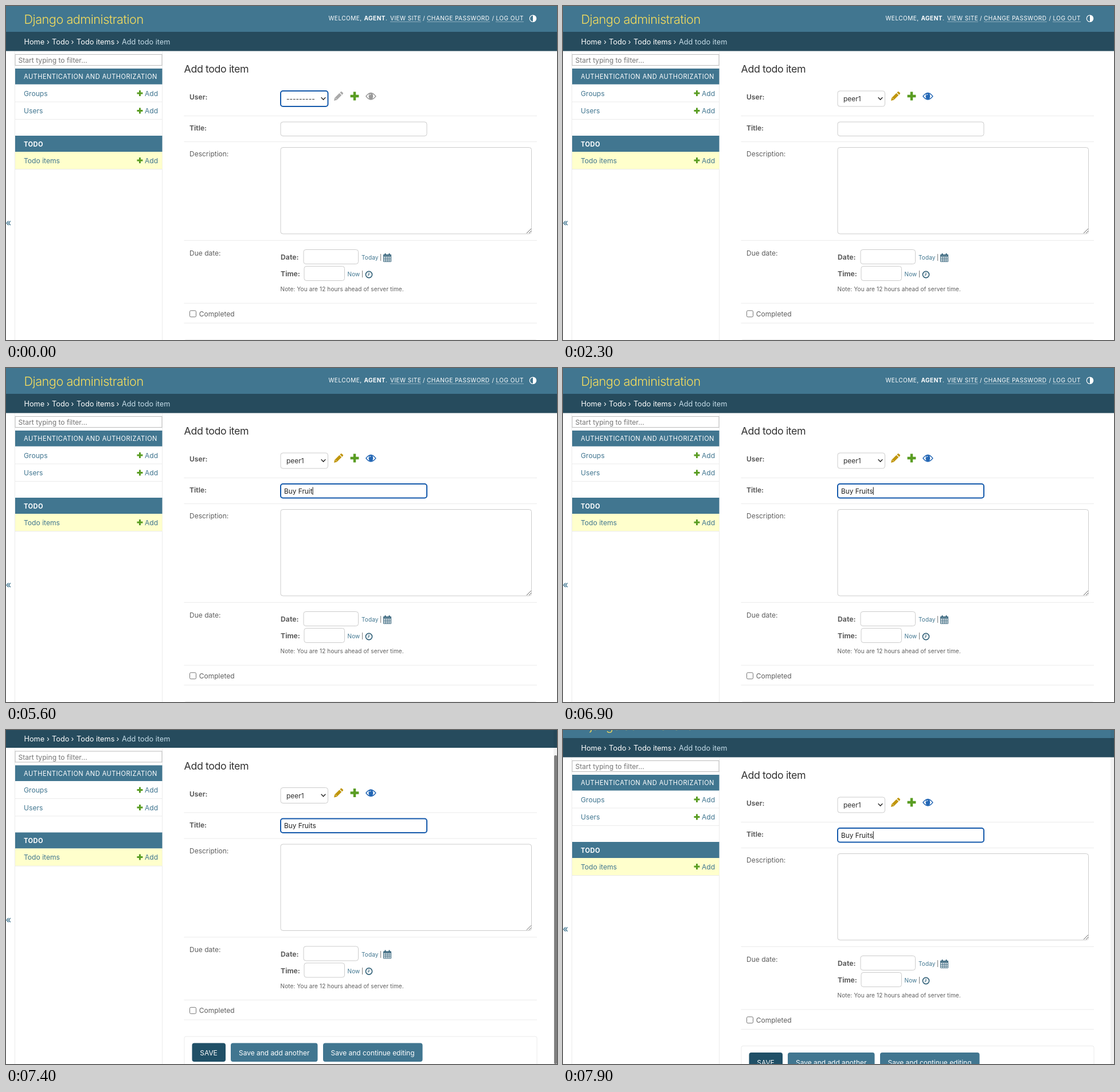
An HTML page for the animation above (8 s loop, 961 by 582 pixels).

```html
<!DOCTYPE html>
<html lang="en">
<head>
<meta charset="utf-8">
<title>Add todo item</title>
<style>
  html, body { margin: 0; width: 100%; height: 100%; overflow: hidden; background: #fff; }
  svg { display: block; font: 12px Inter, "Open Sans", sans-serif; font-optical-sizing: none; }
  text { white-space: pre; }
  .bold { font-weight: 700; }
  .line { stroke: #ebebeb; fill: none; }
  .box { fill: #fff; stroke: #ccc; }
  .focus { stroke: #1459ab; stroke-width: 2; }
  .tools { font-size: 10.05px; letter-spacing: .47px; fill: #fff; }
  .crumbs { font-size: 12.75px; fill: #fff; }
  .caption { font-size: 11.1px; letter-spacing: .45px; fill: #fff; }
  .link { fill: #417690; font-size: 12.1px; }
  .label { fill: #5f5f5f; }
  .small { font-size: 10px; letter-spacing: .12px; }
  .button { font-size: 11.95px; fill: #fff; }
</style>
</head>
<body>
<svg width="961" height="582" viewBox="0 0 961 582">
  <defs>
    <path id="plus" d="M-5 0H5M0-5V5" stroke="#5a9d23" stroke-width="3"/>
    <filter id="shadow" x="-30%" y="-30%" width="160%" height="160%">
      <feDropShadow dx="0" dy="2" stdDeviation="3.5" flood-opacity=".32"/>
    </filter>
  </defs>

  <g id="page">
    <rect width="961" height="45" fill="#417690"/>
    <rect y="45" width="961" height="33.5" fill="#264b5d"/>
    <text x="31.5" y="31" font-size="21.7" font-weight="300" letter-spacing="-.5" fill="#f5dd5d">Django administration</text>
    <g class="tools">
      <text x="562.5" y="25">WELCOME,</text>
      <text x="624.5" y="25"><tspan class="bold">AGENT</tspan>.</text>
      <text x="670" y="25">VIEW SITE</text>
      <text x="727" y="25">/</text>
      <text x="734" y="25">CHANGE PASSWORD</text>
      <text x="847.5" y="25">/</text>
      <text x="854.5" y="25">LOG OUT</text>
      <path d="M670 27.5H724M734 27.5H844M854 27.5H903" stroke="#fff" stroke-opacity=".4"/>
      <circle cx="919" cy="21.8" r="5.7" fill="none" stroke="#fff" stroke-width="1.2"/>
      <path d="M919 16a5.8 5.8 0 0 1 0 11.6z"/>
    </g>
    <g class="crumbs">
      <text x="31.5" y="67">Home</text><text x="71" y="67">›</text>
      <text x="80" y="67">Todo</text><text x="113.5" y="67">›</text>
      <text x="123" y="67">Todo items</text><text x="192.5" y="67">›</text>
      <text x="202" y="67" fill="#c4dce8">Add todo item</text>
    </g>

    <path class="line" d="M15.5 79V640M272.5 79V640"/>
    <rect class="box" x="16" y="84.5" width="256" height="19" style="stroke:#bbb"/>
    <text x="21.5" y="99" font-size="12.1" fill="#757575">Start typing to filter…</text>
    <path d="M16 109H272.5V136.5H16zM16 226H272.5V254H16z" fill="#417690"/>
    <path d="M16 254H272.5V284.5H16z" fill="#ffc"/>
    <path class="line" d="M16 167H272M16 197.5H272M16 284.5H272"/>
    <text class="caption" x="31" y="127">AUTHENTICATION AND AUTHORIZATION</text>
    <text class="caption bold" x="31" y="244.5">TODO</text>
    <g class="link">
      <text x="31" y="156.5">Groups</text><text x="242" y="156.5">Add</text>
      <text x="31" y="187">Users</text><text x="242" y="187">Add</text>
      <text x="31" y="273.5">Todo items</text><text x="242" y="273.5">Add</text>
      <text x="-.5" y="383" font-size="16" font-weight="500">«</text>
    </g>
    <use href="#plus" x="233.5" y="152"/>
    <use href="#plus" x="233.5" y="182.5"/>
    <use href="#plus" x="233.5" y="269"/>

    <text x="310.5" y="116" font-size="17.8" letter-spacing="-.39" fill="#333">Add todo item</text>
    <path class="line" d="M310.5 191.5H926M310.5 236.5H926M310.5 408.5H926M310.5 518H926M310.5 552.5H926"/>
    <g class="label">
      <text class="bold" x="320" y="163">User:</text>
      <text class="bold" x="320" y="217">Title:</text>
      <text x="320" y="262">Description:</text>
      <text x="320" y="434.5">Due date:</text>
      <text class="bold" x="479" y="442.3" font-size="12.2">Date:</text>
      <text class="bold" x="479" y="471.3" font-size="12.2">Time:</text>
      <text class="small" x="478.5" y="497">Note: You are 12 hours ahead of server time.</text>
      <text x="336.7" y="540.7">Completed</text>
    </g>

    <rect id="select" class="box" x="479" y="148" width="82.5" height="27" rx="4"/>
    <text id="choice" x="489" y="166" fill="#333"></text>
    <path d="M549.7 159.3l3.8 4 3.8-4" fill="none" stroke="#222" stroke-width="1.3"/>
    <g id="pencil"><path d="M572 165l1.2-5 8.3-8.3 3.8 3.8-8.3 8.3zM582.4 150.8l1.4-1.4q1-.9 2 0l1.9 1.9q.9 1 0 2l-1.4 1.4z"/><path d="M574.5 160.3l2.3 2.3" stroke="#fff" stroke-width=".8"/></g>
    <use href="#plus" transform="translate(608 157) scale(1.48)"/>
    <g id="eye">
      <path d="M627 157.2q9.3-13 18.8 0q-9.5 13-18.8 0z"/>
      <path d="M628.9 157.2q2-3 4.8-4q-2.6 4 0 8q-2.800-1-4.800-4zM643.900 157.200q-2-3-4.800-4q2.600 4 0 8q2.800-1 4.800-4z" fill="#fff"/>
      <path d="M634 155.500q.7-1.800 2.500-1.800" fill="none" stroke="#fff"/>
    </g>

    <rect id="title" class="box" x="479" y="202" width="255" height="24.500" rx="4"/>
    <text id="typed" x="485" y="218.500" font-size="11.850" fill="#222"></text>
    <path id="caret" d="M0 207.500V221" stroke="#111"/>
    <rect class="box" x="479" y="246.500" width="437.500" height="150.500" rx="4"/>
    <path d="M908 396l8-8M912 396l4-4" stroke="#666"/>
    <rect class="box" x="519" y="424.500" width="95.500" height="25" rx="4"/>
    <rect class="box" x="520" y="453.500" width="70.500" height="25" rx="4"/>
    <g class="link">
      <text class="small" x="620" y="442">Today</text><text class="small" x="652" y="442" fill="#555">|</text>
      <text class="small" x="595.500" y="471">Now</text><text class="small" x="620" y="471" fill="#555">|</text>
    </g>
    <g fill="none" stroke="#37657c">
      <path d="M658.500 433.500H671.500V445.500H658.500zM658.500 436.500H671.500M658.500 439.500H671.500M658.500 442.500H671.500M661.800 436V445M665 436V445M668.200 436V445"/>
      <path d="M658 434.500H672M661.500 431V434M668.500 431V434" stroke-width="2"/>
      <circle cx="633" cy="468" r="5.600" stroke-width="1.700"/>
      <path d="M633 464.500V468.300L630.800 469.500" stroke-width="1.200"/>
    </g>
    <rect x="320.500" y="530.800" width="11" height="11" rx="2" fill="#fff" stroke="#767676"/>

    <rect class="line" x="311" y="581.500" width="615" height="70" rx="3"/>
    <rect x="324.500" y="593" width="58.500" height="32.500" rx="4" fill="#205067"/>
    <path d="M396 593H540q3.500 0 3.500 4V621.500q0 4-3.500 4H396q-4 0-4-4V597q0-4 4-4zM557 593H722.500q4 0 4 4V621.500q0 4-4 4H557q-4 0-4-4V597q0-4 4-4z" fill="#417690"/>
    <g class="button">
      <text x="338.300" y="614.500">SAVE</text>
      <text x="406" y="614.500">Save and add another</text>
      <text x="566.500" y="614.500">Save and continue editing</text>
    </g>

    <g id="menu">
      <rect x="471" y="146" width="89" height="71" rx="5.500" fill="#e9e9e9" stroke="#c4c4c4" stroke-width=".5" filter="url(#shadow)"/>
      <rect id="highlight" x="476" width="79" height="20.700" rx="4" fill="#539dfb"/>
      <path id="check" d="M481.500 162l2.800 3.300 5-7.800" fill="none" stroke-width="1.700"/>
      <text class="item" x="493.500" y="166">---------</text>
      <text class="item" x="493.500" y="186.500">agent</text>
      <text class="item" x="493.500" y="207">peer1</text>
    </g>
  </g>

  <g id="scrollbar">
    <rect x="955" width="6" height="582" fill="#000" fill-opacity=".05"/>
    <rect id="thumb" x="956" width="5" rx="2" fill="#000" fill-opacity=".48"/>
  </g>
</svg>

<script>
const $ = id => document.getElementById(id);
const LOOP = 8000, STEP = 100;
const PAGE_HEIGHT = 629.5, VIEW = 582;
const TITLE = "Buy Fruits";
const keyTimes = [3600, 3700, 3900, 4100, 4500, 4800, 5000, 5300, 5500, 5900];
const scrollKeys = [[7000, 0], [7100, 12], [7200, 32.5], [7300, 43.5], [7400, 47.5], [7650, 46.5], [7900, 31]];
const MENU_OPEN = 600, PICKED = 1900, FOCUSED = 2400;
const items = [...document.querySelectorAll(".item")];

const clamp = v => Math.max(0, Math.min(1, v));
const show = (el, on) => el.setAttribute("visibility", on ? "visible" : "hidden");

function interpolate(keys, t) {
  let value = keys[0][1];
  for (let i = 1; i < keys.length; i++) {
    const [t0, v0] = keys[i - 1], [t1, v1] = keys[i];
    if (t >= t0) value = v0 + (v1 - v0) * clamp((t - t0) / (t1 - t0));
  }
  return value;
}

function drawSelect(t) {
  const picked = t >= PICKED;
  $("select").classList.toggle("focus", t < MENU_OPEN);
  $("select").style.stroke = t >= MENU_OPEN && !picked ? "#888" : "";
  $("choice").textContent = picked ? "peer1" : "---------";
  $("pencil").setAttribute("fill", picked ? "#c0960c" : "#aaa");
  $("eye").setAttribute("fill", picked ? "#2467b5" : "#999");

  const opacity = t < MENU_OPEN ? 0 : 1 - clamp((t - 1800) / 300);
  const active = t < 1000 ? 0 : t < 1200 ? 1 : 2;
  $("menu").setAttribute("opacity", opacity);
  $("highlight").setAttribute("y", 151.3 + 20.5 * active);
  $("check").setAttribute("stroke", active ? "#222" : "#fff");
  items.forEach((item, i) => item.setAttribute("fill", i === active ? "#fff" : "#222"));
}

function drawTitle(t) {
  const count = keyTimes.filter(k => t >= k).length;
  $("title").classList.toggle("focus", t >= FOCUSED);
  $("typed").textContent = TITLE.slice(0, count);
  // The caret blinks from the last moment it was reset.
  const reset = count ? keyTimes[count - 1] : FOCUSED;
  show($("caret"), t >= FOCUSED && (t - reset) % 1000 < 500);
  const width = count ? $("typed").getComputedTextLength() : 0;
  $("caret").setAttribute("transform", `translate(${485.5 + width} 0)`);
}

function drawScroll(t) {
  const y = interpolate(scrollKeys, t);
  $("page").setAttribute("transform", `translate(0 ${-y})`);
  show($("scrollbar"), t >= 7100);
  $("thumb").setAttribute("y", y * VIEW / PAGE_HEIGHT);
  $("thumb").setAttribute("height", VIEW * VIEW / PAGE_HEIGHT);
  $("thumb").setAttribute("opacity", 1 - clamp((t - 7700) / 200));
}

function frame() {
  const t = Math.floor(performance.now() % LOOP / STEP) * STEP;
  drawSelect(t);
  drawTitle(t);
  drawScroll(t);
  requestAnimationFrame(frame);
}
frame();
</script>
</body>
</html>
```
